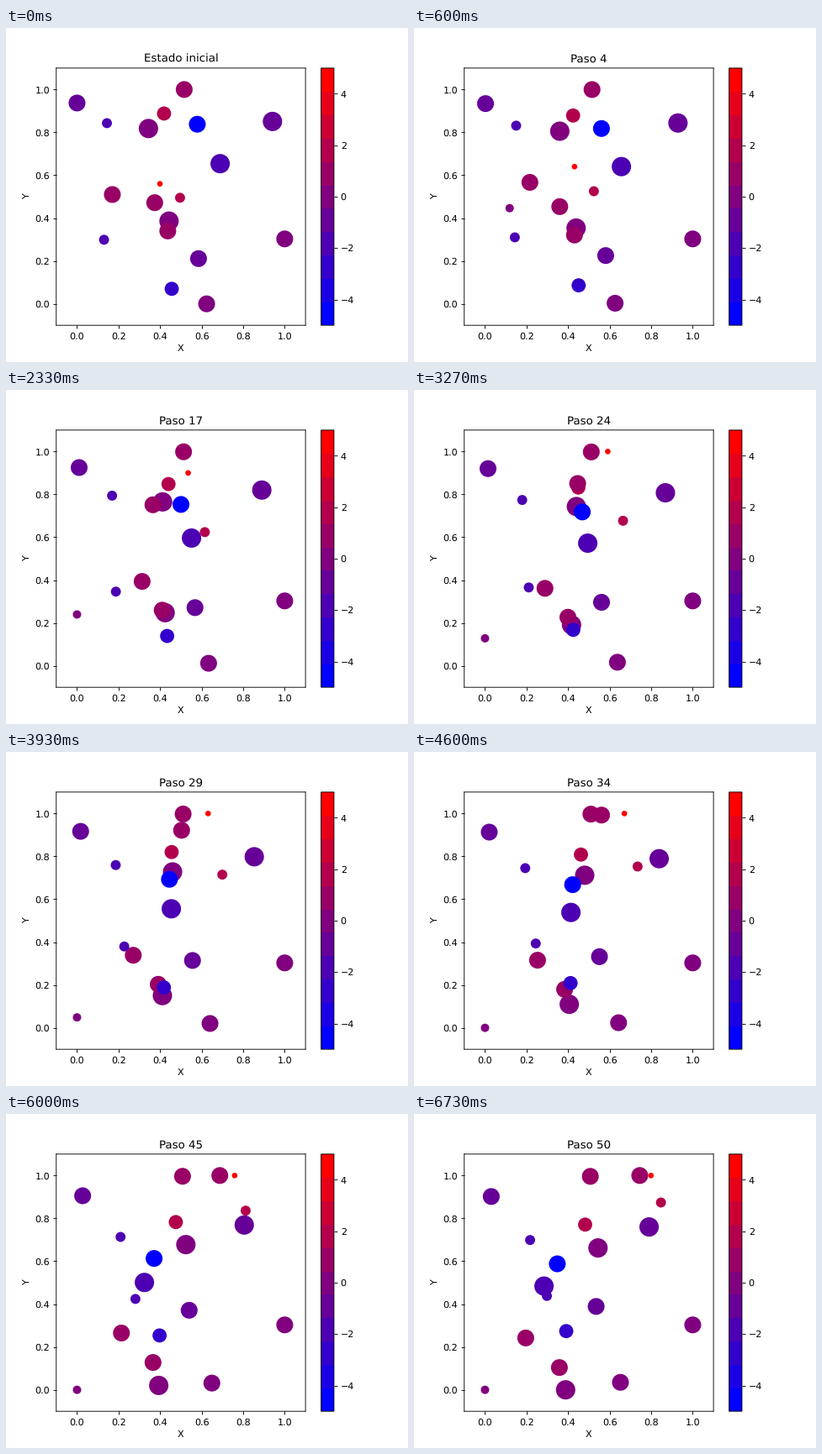
Animation, 478 px wide and 398 px high, one loop 6790 ms. Source, as a matplotlib script:

```python
import numpy as np
import matplotlib.pyplot as plt
from matplotlib.animation import FuncAnimation
from matplotlib.colors import LinearSegmentedColormap

W, H, DPI = 478, 398, 80
LOOP_MS = 6790
STEPS = 50

# marker areas
TINY, SMALL, MEDIUM, LARGE, HUGE = 36, 115, 230, 325, 430

# two balls start on the same spot and fly apart
PAIR, FLING = 0.17 + 0.51j, 0.575 + 0.71j

# charge -> balls as (area, start, drift over all steps), x + yj, drawn in this order
BALLS = {
    0: [(SMALL * 0.7, PAIR, -1.12 * FLING),
        (HUGE, 0.344 + 0.818j, 0.2 - 0.156j),
        (HUGE, 0.443 + 0.386j, -0.055 - 0.406j),
        (LARGE, 0.624 + 0j, 0.028 + 0.035j),
        (LARGE, 1 + 0.303j, 0)],
    2: [(MEDIUM, 0.419 + 0.888j, 0.063 - 0.117j),
        (SMALL, 0.496 + 0.495j, 0.351 + 0.379j)],
    1: [(LARGE, 0.516 + 1j, -0.009 - 0.004j),
        (LARGE, PAIR, FLING),
        (LARGE, 0.374 + 0.472j, -0.178 - 0.23j),
        (LARGE, 0.437 + 0.34j, -0.079 - 0.236j)],
    5: [(TINY, 0.399 + 0.56j, 0.4 + 1j)],
    -1: [(LARGE, 0 + 0.937j, 0.03 - 0.035j),
         (HUGE, 0.941 + 0.851j, -0.151 - 0.091j),
         (LARGE, 0.585 + 0.211j, -0.05 + 0.178j)],
    -2: [(SMALL, 0.144 + 0.843j, 0.073 - 0.144j),
         (HUGE, 0.689 + 0.654j, -0.405 - 0.17j),
         (SMALL, 0.13 + 0.299j, 0.168 + 0.139j)],
    -3: [(MEDIUM, 0.456 + 0.07j, -0.065 + 0.204j)],
    -5: [(LARGE, 0.579 + 0.838j, -0.231 - 0.25j)],
}
charge, area, start, drift = map(
    np.array, zip(*((q, *ball) for q, balls in BALLS.items() for ball in balls)))


def positions(step):
    """Constant velocity; each coordinate stops at the walls of the unit box."""
    z = start + drift * step / STEPS
    return np.clip(np.column_stack([z.real, z.imag]), 0, 1)


# soft, unsnapped lines and letters
plt.rcParams.update({"path.snap": False, "text.hinting": "none"})

fig, ax = plt.subplots(figsize=(W / DPI, H / DPI), dpi=DPI)
cmap = LinearSegmentedColormap.from_list("charge", ["blue", "purple", "red"], N=11)
dots = ax.scatter(*positions(0).T, s=area, c=charge, cmap=cmap,
                  vmin=-5, vmax=5, linewidths=0)
fig.colorbar(dots, ax=ax, ticks=range(-4, 5, 2))

ticks = np.linspace(0, 1, 6)
ax.set(xlim=(-0.1, 1.1), ylim=(-0.1, 1.1), xticks=ticks, yticks=ticks,
       xlabel="X", ylabel="Y")
title = ax.set_title("Estado inicial")


def update(step):
    dots.set_offsets(positions(step))
    title.set_text(f"Paso {step}" if step else "Estado inicial")
    return dots, title


anim = FuncAnimation(fig, update, frames=STEPS + 1,
                     interval=LOOP_MS / (STEPS + 1), repeat=True, repeat_delay=0)
plt.show()
```
